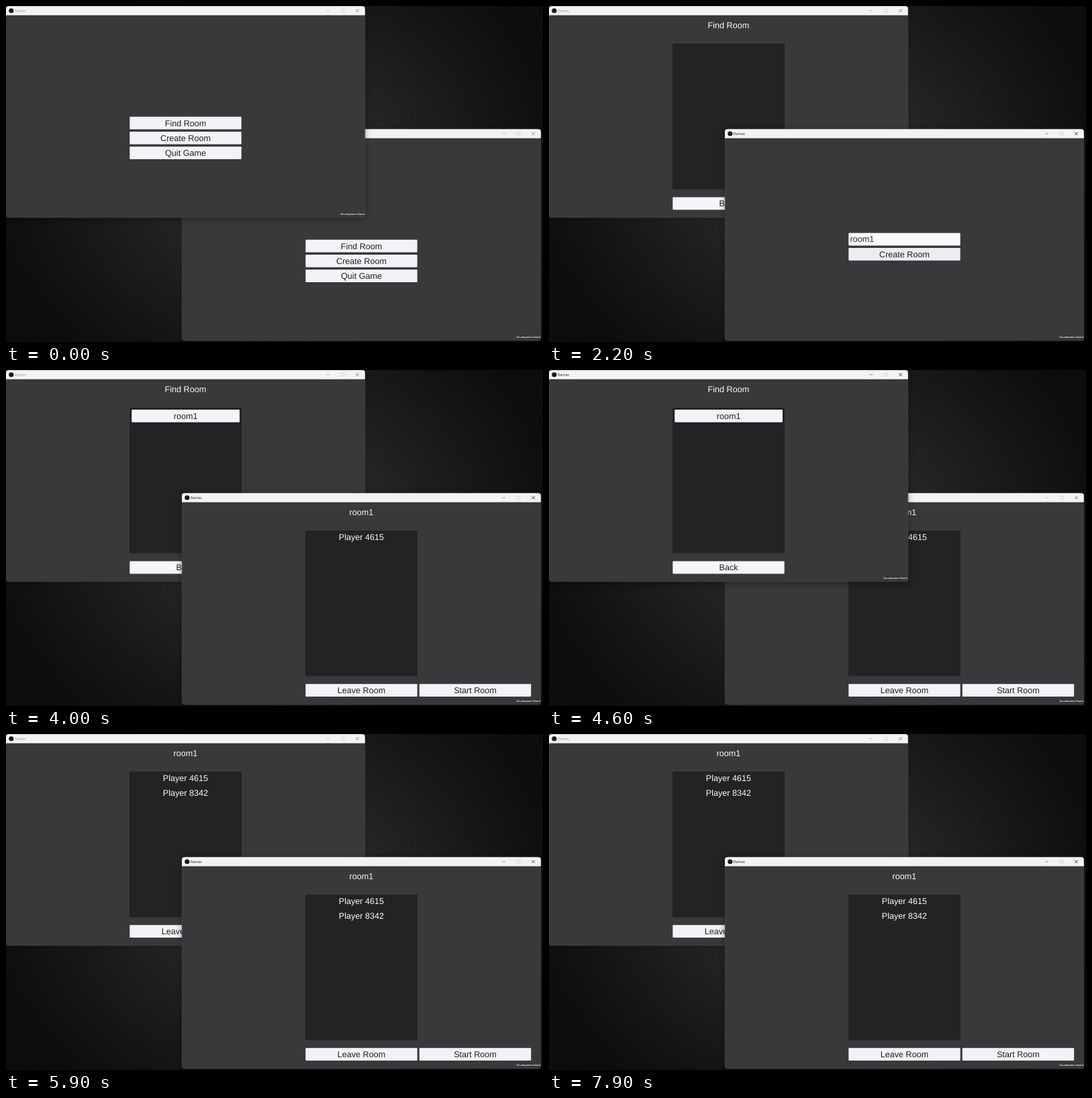
Recreate the animation shown at these times as an HTML page. Size 800x500 px, loop 8 s.

```html
<!DOCTYPE html>
<html lang="en">
<head>
<meta charset="utf-8">
<title>Room lobby</title>
<style>
  html, body { margin: 0; width: 100%; height: 100%; overflow: hidden; background: #121012; }
  svg { display: block; width: 800px; height: 500px; position: absolute; left: 0; top: 0; }
  text { text-rendering: geometricPrecision; font: 12.6px "Liberation Sans", Arial, sans-serif; }
  .front { filter: drop-shadow(0 3px 5px rgba(0, 0, 0, .38)); }
  .back { filter: drop-shadow(0 1px 2px rgba(0, 0, 0, .25)); }
</style>
</head>
<body>
<svg viewBox="0 0 800 500">
  <defs>
    <radialGradient id="glow" gradientUnits="userSpaceOnUse" cx="0" cy="0" r="1"
      gradientTransform="translate(400 235) scale(430 370)">
      <stop offset="0" stop-color="#302e30"/>
      <stop offset=".4" stop-color="#292729"/>
      <stop offset=".75" stop-color="#1a181a"/>
      <stop offset="1" stop-color="#100e10"/>
    </radialGradient>
    <filter id="grain" x="0" y="0" width="100%" height="100%">
      <feTurbulence type="fractalNoise" baseFrequency=".55" numOctaves="2" seed="4"/>
      <feColorMatrix values="0 0 0 0 0  0 0 0 0 0  0 0 0 0 0  1.2 0 0 0 -.45"/>
    </filter>
  </defs>
  <rect width="800" height="500" fill="url(#glow)"/>
  <rect width="800" height="500" filter="url(#grain)" opacity=".6"/>
</svg>
<svg id="stage" viewBox="0 0 800 500"></svg>

<script>
const DURATION = 8000;
const CENTER = 267.4;
const ROOM = 'room1';
const PLAYERS = ['Player 4615', 'Player 8342'];

const rect = (x, y, w, h, fill, extra = '') =>
  `<rect x="${x}" y="${y}" width="${w}" height="${h}" fill="${fill}" ${extra}/>`;

// Text is placed by the vertical middle of its capitals.
const label = (str, y, { x = CENTER, fill = '#faf8fb', size = 12.6, anchor = 'middle' } = {}) =>
  `<text x="${x}" y="${y + size * .358}" fill="${fill}" text-anchor="${anchor}" style="font-size:${size}px">${str}</text>`;

const button = (str, y, { x = 184.3, w = 166.4, fill = '#f4f2f6' } = {}) =>
  rect(x, y, w, 18.7, fill, 'rx="1"') +
  label(str, y + 9.4, { x: x + w / 2, fill: '#201e21' });

const panel = () => rect(184, 56, 167, 216.5, '#242225');

const menu = (pressed = -1) => ['Find Room', 'Create Room', 'Quit Game']
  .map((str, i) => button(str, 164.8 + 22.2 * i, { fill: i === pressed ? '#cac8cc' : '#f4f2f6' }))
  .join('');

const finder = (rooms = []) =>
  label('Find Room', 28) + panel() +
  rooms.map(name => button(name, 59, { x: 187.2, w: 160.8, fill: '#f6f3f8' })).join('') +
  button('Back', 284.5, { fill: '#f7f4f9' });

const creator = fill =>
  rect(184.3, 154.8, 166.4, 18.7, '#faf9fb', 'rx="1"') +
  label(ROOM, 163.5, { x: 186.5, fill: '#29272a', anchor: 'start' }) +
  button('Create Room', 177, { fill });

const loading = () => label('Loading', 164.5, { size: 16.8 });

const lobby = (count, host) =>
  label(ROOM, 28) + panel() +
  PLAYERS.slice(0, count).map((name, i) => label(name, 65.6 + 22.3 * i)).join('') +
  button('Leave Room', 284.3) +
  (host ? button('Start Room', 284.3, { x: 353.8 }) : '');

function frame(x, y, content, front, active) {
  const ink = active ? '#1c1a1d' : '#9d9a9e';
  const cross = active ? '#1c1a1d' : '#6f6c70';
  const line = (d, color) => `<path d="${d}" fill="none" stroke="${color}" stroke-width=".8"/>`;
  return `<g transform="translate(${x} ${y})">
    <g class="${front ? 'front' : 'back'}">
      ${rect(0.2, 0.2, 534.6, 314.6, '#3a383b', 'rx="4" stroke="#4e4c4f" stroke-width=".6"')}
    </g>
    <path d="M0 13.8V4Q0 .3 4 .3H531Q534.8 .3 534.8 4V13.8Z" fill="#f5f2f6"/>
    <circle cx="7.8" cy="7" r="3.6" fill="#1c1a1d"/>
    <text x="13" y="9" fill="${ink}" style="font:5.4px 'Open Sans','Noto Sans',sans-serif">Ramas</text>
    ${line('M477.3 7h4.8', active ? '#777478' : '#b3b0b4')}
    ${line('M499.6 4.8h4.2v4.2h-4.2z', '#d0cdd1')}
    ${line('M521.3 4.7l4.6 4.6m0-4.6l-4.6 4.6', cross)}
    ${content}
    <text x="533.8" y="311.4" text-anchor="end" fill="#fff" stroke="#111" stroke-width=".7" paint-order="stroke"
      style="font-size:3.9px;font-weight:bold">Development Build</text>
  </g>`;
}

// Start time, front window, left content, right content, whether the front window has focus.
const steps = [
  [0, 'left', menu(), menu(), false],
  [900, 'left', menu(0), menu(), true],
  [1000, 'left', finder(), menu(), true],
  [1700, 'right', finder(), menu(), true],
  [2000, 'right', finder(), menu(1), true],
  [2100, 'right', finder(), creator('#f4f2f6'), true],
  [2200, 'right', finder(), creator('#eeecf0'), true],
  [3200, 'right', finder(), loading(), true],
  [3500, 'right', finder(), lobby(1, true), true],
  [4000, 'right', finder([ROOM]), lobby(1, true), true],
  [4600, 'left', finder([ROOM]), lobby(1, true), true],
  [5200, 'left', loading(), lobby(1, true), true],
  [5500, 'left', lobby(2, false), lobby(2, true), true],
  [5900, 'right', lobby(2, false), lobby(2, true), true],
  [7500, 'left', lobby(2, false), lobby(2, true), true],
  [7900, 'right', lobby(2, false), lobby(2, true), true]
];

const stage = document.getElementById('stage');
let shown = null;

function draw() {
  const time = performance.now() % DURATION;
  const step = steps.filter(([start]) => start <= time).pop();
  if (step !== shown) {
    shown = step;
    const [, top, leftContent, rightContent, focused] = step;
    const leftFront = top === 'left';
    const left = frame(0, 0, leftContent, leftFront, leftFront && focused);
    const right = frame(262, 183, rightContent, !leftFront, !leftFront && focused);
    stage.innerHTML = leftFront ? right + left : left + right;
  }
  requestAnimationFrame(draw);
}
draw();
</script>
</body>
</html>
```
